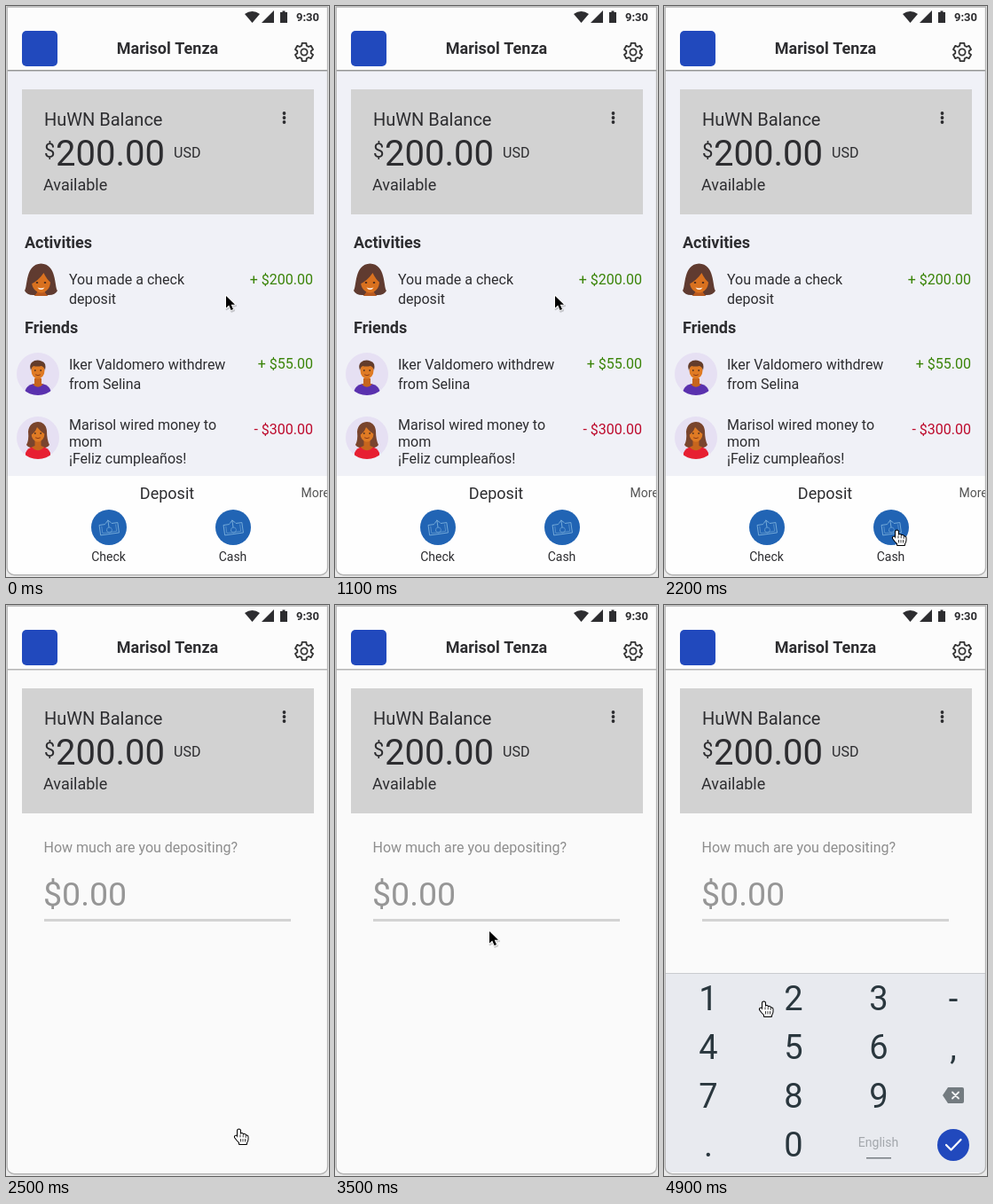
An HTML page with a canvas for the animation above (5 s loop, 364 by 644 pixels).

```html
<!DOCTYPE html>
<html lang="en">
<head>
<meta charset="utf-8">
<title>Deposit flow</title>
<style>
  html, body { margin: 0; width: 100%; height: 100%; overflow: hidden; background: #e9e9e9; }
  canvas { display: block; width: 364px; height: 644px; }
</style>
</head>
<body>
<canvas id="stage"></canvas>
<script>
const W = 364, H = 644, LOOP = 5000, STEP = 100;
const FORM_AT = 2500, KEYPAD_AT = 4100;
const INK = '#2d2d30', BLUE = '#2149bd', GREEN = '#3a8408', RED = '#bd0a2c';

const canvas = document.getElementById('stage');
const ctx = canvas.getContext('2d');
const ratio = window.devicePixelRatio || 1;
canvas.width = W * ratio;
canvas.height = H * ratio;

// Pointer hotspot: time, x, y, and whether the move towards the point is eased
const track = [
  [0, 248, 327], [1400, 248, 327], [1700, 261, 501], [1900, 264, 591], [2800, 264, 591],
  [3000, 251, 563], [3500, 174, 368], [3650, 171, 335],
  [4400, 171, 335], [4900, 114, 447, true], [LOOP, 114, 447]
];

function text(str, x, y, size, { color = INK, weight = 400, align = 'left' } = {}) {
  ctx.font = `${weight} ${size}px Roboto, sans-serif`;
  ctx.fillStyle = color;
  ctx.textAlign = align;
  ctx.fillText(str, x, y);
}

function rect(x, y, w, h, color, radius = 0) {
  ctx.fillStyle = color;
  ctx.beginPath();
  ctx.roundRect(x, y, w, h, radius);
  ctx.fill();
}

function oval(x, y, rx, ry, color) {
  ctx.fillStyle = color;
  ctx.beginPath();
  ctx.ellipse(x, y, rx, ry, 0, 0, Math.PI * 2);
  ctx.fill();
}

function shape(d, { fill, stroke, width = 1 }) {
  const path = new Path2D(d);
  if (stroke) {
    ctx.strokeStyle = stroke;
    ctx.lineWidth = width;
    ctx.lineJoin = ctx.lineCap = 'round';
    ctx.stroke(path);
  }
  if (fill) {
    ctx.fillStyle = fill;
    ctx.fill(path);
  }
}

function at(x, y, draw) {
  ctx.save();
  ctx.translate(x, y);
  draw();
  ctx.restore();
}

function gear() {
  const teeth = 6;
  ctx.beginPath();
  for (let i = 0; i < teeth; i++) {
    const mid = i / teeth * Math.PI * 2 - Math.PI / 2;
    for (const [offset, r] of [[-0.36, 7.8], [-0.23, 10.5], [0.23, 10.5], [0.36, 7.8]]) {
      ctx.lineTo(Math.cos(mid + offset) * r, Math.sin(mid + offset) * r);
    }
  }
  ctx.closePath();
  ctx.moveTo(3.6, 0);
  ctx.arc(0, 0, 3.6, 0, Math.PI * 2);
  ctx.strokeStyle = '#333';
  ctx.lineWidth = 1.8;
  ctx.lineJoin = 'round';
  ctx.stroke();
}

function statusBar() {
  shape('M269 9Q277.5 3 286 9L277.5 19Z', { fill: INK });
  shape('M302 5V19H288Z', { fill: INK });
  shape('M309 7H311.5V5.5H314.5V7H317V19H309Z', { fill: INK });
  text('9:30', 353, 17, 13, { weight: 700, align: 'right' });
}

function header(rule) {
  rect(0, 0, W, 73, '#fcfcfc');
  rect(0, 72, W, 1.5, rule);
  statusBar();
  rect(18, 28, 40, 40, BLUE, 5);
  text('Marisol Tenza', 182, 54, 18, { weight: 700, align: 'center' });
  at(336, 52, gear);
}

function balanceCard() {
  rect(18, 94, 329, 141, '#d2d2d2');
  text('HuWN Balance', 43, 135, 20);
  text('$', 43, 171, 22);
  text('200.00', 56, 180, 40);
  text('USD', 189, 171, 16);
  text('Available', 42, 208, 18);
  for (const y of [121, 126, 131]) oval(313.5, y, 1.9, 1.9, INK);
}

function womanLarge() {
  shape('M-18.5 12C-15 8-18-18 0-18.5C18-18 15 8 18.5 12Q16 17 9 17H-9Q-16 17-18.5 12Z', { fill: '#603b30' });
  shape('M-8 18Q-4 15-4 11H4Q4 15 8 18Z', { fill: '#b95a20' });
  oval(0, 2, 10.5, 12.5, '#d9711f');
  shape('M-12 5Q-3 1 3-8Q6-1 12 4Q14-13 0-15Q-14-13-12 5Z', { fill: '#603b30' });
  for (const x of [-4.5, 4.5]) oval(x, 3, 1.3, 1.1, '#49281c');
  shape('M-4 8.5Q0 10 4 8.5Q2.5 11 0 11Q-2.5 11-4 8.5Z', { fill: '#fff1e5' });
}

function badge(draw) {
  oval(0, 0, 24, 24, '#e6e0f3');
  ctx.save();
  ctx.beginPath();
  ctx.arc(0, 0, 24, 0, Math.PI * 2);
  ctx.clip();
  draw();
  ctx.restore();
}

function face(y) {
  oval(0, y, 7.5, 9.5, '#df7a24');
  for (const x of [-3.2, 3.2]) oval(x, y, 0.9, 0.9, '#51301f');
  shape(`M-2.5 ${y + 5}Q0 ${y + 6.5} 2.5 ${y + 5}`, { stroke: '#8f3d16' });
}

function man() {
  shape('M-14.5 24V19Q-13 13-5 11H5Q13 13 14.5 19V24Z', { fill: '#5a31ae' });
  shape('M-4 5H4V11L6 11.5Q0 18-6 11.5L-4 11Z', { fill: '#c7651d' });
  face(-4);
  shape('M-8-4Q-10-10-7-13Q-2-17 4-14.5Q10-13 8-4Q7-8 4-9Q-1-8-5-9Q-7-8-8-4Z', { fill: '#633c2b' });
}

function woman() {
  shape('M-13 8Q-10 3-11-7C-10-21 9-22 10-8Q10 2 13 8Q10 12 4 11H-4Q-10 12-13 8Z', { fill: '#79442d' });
  shape('M-14 24V17Q-12 11-4 10H4Q12 11 14 17V24Z', { fill: '#e71f32' });
  shape('M-3.5 2H3.5V9L7 10.5Q0 18-7 10.5L-3.5 9Z', { fill: '#c7651d' });
  face(-5);
  shape('M-8-3Q-3-6-1-12Q3-7 8-4Q10-16 0-17Q-11-16-8-3Z', { fill: '#79442d' });
}

function amount(str, y, color) {
  text(str, 346, y, 16, { color, align: 'right' });
}

function depositButton(x, label) {
  oval(x, 588, 20, 20, '#2164b4');
  at(x, 588, () => {
    ctx.rotate(-0.14);
    const line = { stroke: '#82b6df', width: 0.8 };
    shape('M-4-4H-10.5V7.5H10.5V-4H4M0 0V-8M-3-5L0-8L3-5', line);
    shape('M-8-2V5.5H8V-2M-3 3A3 3 0 0 0 3 3A3 3 0 0 0-3 3', { ...line, width: 0.5 });
  });
  text(label, x - 0.5, 626, 14, { align: 'center' });
}

function homeScreen() {
  rect(0, 0, W, H, '#f0f1f7');
  header('#969696');
  balanceCard();

  text('Activities', 21, 273, 18, { weight: 700 });
  at(39.5, 309, womanLarge);
  text('You made a check', 71, 314, 16);
  text('deposit', 71, 336, 16);
  amount('+ $200.00', 314, GREEN);

  text('Friends', 21, 369, 18, { weight: 700 });
  at(36, 415, () => badge(man));
  text('Iker Valdomero withdrew', 71, 410, 16);
  text('from Selina', 71, 432, 16);
  amount('+ $55.00', 409, GREEN);

  at(36, 487, () => badge(woman));
  text('Marisol wired money to', 71, 478, 16);
  text('mom', 71, 497, 16);
  text('¡Feliz cumpleaños!', 71, 516, 16);
  amount('- $300.00', 483, RED);

  rect(0, 530, W, 114, '#fefefe');
  text('Deposit', 181.5, 556, 18, { align: 'center' });
  text('More', 332.5, 554, 14, { color: '#555' });
  depositButton(116, 'Check');
  depositButton(256, 'Cash');
}

function formScreen() {
  rect(0, 0, W, H, '#fafafa');
  header('#b5b5b5');
  balanceCard();
  text('How much are you depositing?', 42.5, 279, 16, { color: '#8e8e8e' });
  text('$0.00', 42, 339, 37.5, { color: '#969696' });
  rect(43, 354, 278, 3, '#d3d3d3');
}

function keypad() {
  const color = '#2a373e', columns = [50, 146, 242, 326];
  rect(0, 415, W, 225, '#e8eaef');
  rect(0, 415, W, 1, '#c9cbcf');
  ['123-', '456,', '789', '.0'].forEach((row, r) => {
    [...row].forEach((key, c) =>
      text(key, columns[c], 457 + r * 55, 38, { color, align: 'center' }));
  });
  shape('M314 553L320 544H336Q338 544 338 546V560Q338 562 336 562H320Z', { fill: '#737b80' });
  shape('M325 549.5L332 556.5M332 549.5L325 556.5', { stroke: '#f2f3f5', width: 1.8 });
  text('English', 241.5, 611, 14, { color: '#a3a7ac', align: 'center' });
  rect(228, 623, 28, 1.5, '#777d82');
  oval(326, 609, 18, 18, BLUE);
  shape('M318 609L323.5 614.5L334.5 603', { stroke: '#fff', width: 2.2 });
}

function pointerAt(time) {
  const next = Math.max(1, track.findIndex(key => key[0] >= time));
  const [t0, x0, y0] = track[next - 1];
  const [t1, x1, y1, eased] = track[next];
  let u = (time - t0) / (t1 - t0);
  if (eased) u = u * u * (3 - 2 * u);
  return [x0 + (x1 - x0) * u, y0 + (y1 - y0) * u];
}

function arrowCursor() {
  const d = 'M0 0V13.5L3.2 10.6L5.6 16L8 15L5.7 9.7H10Z';
  at(0.8, 1.4, () => shape(d, { stroke: 'rgba(0,0,0,.18)', width: 2.5 }));
  shape(d, { stroke: '#fff', width: 1.8, fill: '#000' });
}

function handCursor() {
  ctx.translate(-1, 0);
  shape('M-2 10V2Q-2 .5-.5 .5Q1 .5 1 2V7Q1 5 2.7 5Q4.2 5 4.2 7Q4.5 5.7 6 6Q7.2 6.3 7.2 7.7' +
    'Q9.5 6.8 9.5 9V12Q9.3 14 8 15.5V17H0V15.3Q-2.5 13-5 9.5Q-5.5 8-4 7.6Q-3 7.6-2 10Z',
    { stroke: '#000', width: 2, fill: '#fff' });
  shape('M1 7V9M4.2 7V9M7.2 8V9.5M1.5 11.5V14M4 11.5V14M6.5 11.5V14', { stroke: '#000', width: 0.8 });
}

function pointer(time) {
  const [x, y] = pointerAt(time);
  const onButton = y >= 568;
  const onField = time > 3500;
  at(x, y, onButton || onField ? handCursor : arrowCursor);
}

function deviceOutline() {
  ctx.beginPath();
  ctx.roundRect(1.2, 1, 361.3, 640.7, [0, 0, 8, 8]);
}

function draw(time) {
  ctx.setTransform(ratio, 0, 0, ratio, 0, 0);
  rect(0, 0, W, H, '#e9e9e9');
  ctx.save();
  deviceOutline();
  ctx.clip();
  if (time < FORM_AT) homeScreen();
  else formScreen();
  if (time >= KEYPAD_AT) keypad();
  ctx.restore();

  deviceOutline();
  ctx.strokeStyle = '#b4b4b4';
  ctx.lineWidth = 1.4;
  ctx.stroke();
  pointer(time);
}

const start = performance.now();
function tick() {
  const time = (performance.now() - start) % LOOP;
  draw(Math.floor(time / STEP) * STEP);
  requestAnimationFrame(tick);
}
tick();
</script>
</body>
</html>
```
